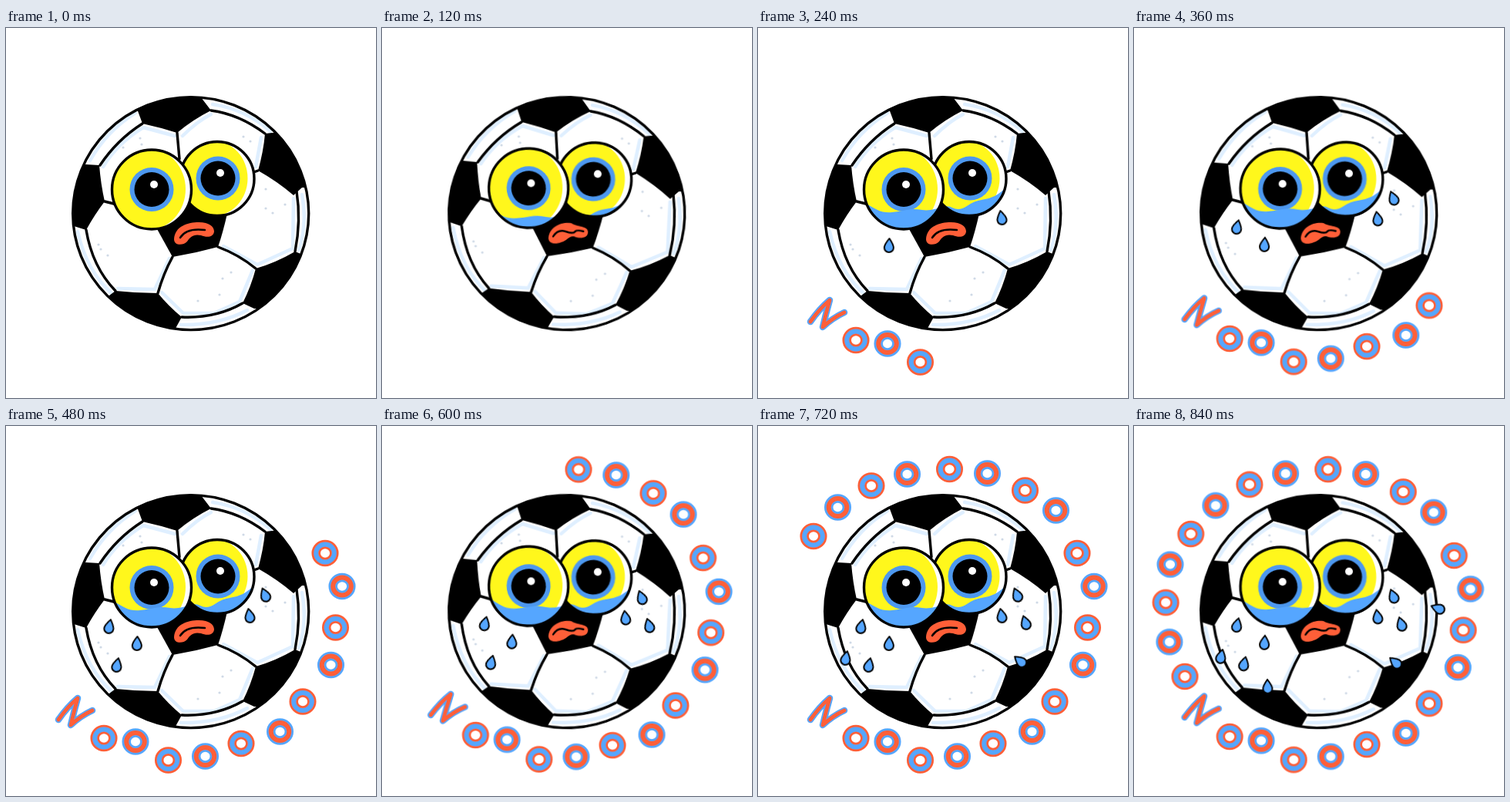
These frames come from a looping animation (480x480 px, 960 ms). An HTML page:

```html
<!DOCTYPE html>
<html lang="en">
<head>
<meta charset="utf-8">
<title>Crying football</title>
<style>
  html, body { margin: 0; width: 100%; height: 100%; overflow: hidden; background: #fff; }
  svg { display: block; width: 100vw; height: 100vh; }
  #scene { transform-origin: 239px 242px; }
  .line { fill: none; stroke: #000; stroke-width: 3.4; stroke-linecap: round; stroke-linejoin: round; }
  .shade { fill: none; stroke: #dfefff; stroke-width: 4.5; stroke-linecap: round; stroke-linejoin: round; }
  .water { fill: #55a6ff; }
  .lip { fill: #ff5f38; }
  .letter { fill: none; stroke-linecap: round; stroke-linejoin: round; }
</style>
</head>
<body>
<svg viewBox="0 0 480 480" role="img" aria-label="Nooo">
  <defs>
    <clipPath id="ballClip"><ellipse cx="239.7" cy="240.6" rx="153" ry="151"/></clipPath>
    <clipPath id="leftClip"><ellipse cx="189" cy="209.5" rx="51.5" ry="51.5"/></clipPath>
    <clipPath id="rightClip"><ellipse cx="274" cy="195.5" rx="48" ry="48"/></clipPath>
  </defs>
  <g id="scene">
    <g clip-path="url(#ballClip)">
      <rect x="80" y="80" width="320" height="320" fill="#fff"/>
      <g class="shade">
        <path d="M109 172Q130 134 168 110M126 180Q144 150 178 129L219 140"/>
        <path d="M268 99Q310 105 343 134M229 140Q248 121 266 112M331 142L324 180"/>
        <path d="M384 216Q391 255 380 288M373 221L372 286L326 307L282 283"/>
        <path d="M93 264Q104 315 139 346M212 299L193 339L145 338"/>
        <path d="M202 343L230 370L270 370L303 355L320 314M227 385Q275 386 313 366"/>
      </g>
      <g id="freckles" fill="#cfd9e6"></g>
      <path d="M166 88L170 105L177 124Q200 129 222 136Q242 119 266 107L253 90V78Z"/>
      <path d="M80 178L104 177L121 178Q123 203 128 225Q115 242 104 262L88 257L78 255Z"/>
      <path d="M336 137L354 135L400 207L384 207L373 217Q352 199 327 185Q334 160 336 137Z"/>
      <path d="M324 312Q349 305 375 290L400 300L350 365L322 364L307 357Q318 335 324 312Z"/>
      <path d="M142 341Q170 344 197 344Q211 361 228 375L217 395L165 395L130 350Z"/>
      <path d="M190 250L216 297Q246 292 275 284Q282 264 288 236L240 220Z"/>
      <g class="line">
        <path d="M177 124Q144 145 122 178M222 136L225 170M266 107Q303 112 336 137M327 185L316 189"/>
        <path d="M377 212Q383 250 375 290M324 312Q302 294 275 284M216 297Q204 319 197 344"/>
        <path d="M104 262Q112 310 142 341M128 225L140 228M228 375Q272 377 307 357"/>
      </g>
    </g>
    <ellipse class="line" cx="239.7" cy="240.6" rx="153" ry="151"/>

    <g clip-path="url(#rightClip)">
      <rect x="220" y="140" width="110" height="110" fill="#fff"/>
      <ellipse cx="268" cy="195" rx="45.5" ry="49" fill="#fff71c"/>
      <g id="rightIris"></g>
      <path class="water rise" d="M232 238Q243 228 252 233T271 231T290 223T307 218T326 203V255H232Z"/>
    </g>
    <ellipse class="line" cx="274" cy="195.5" rx="48" ry="48"/>
    <circle cx="278" cy="188" r="5" fill="#fff"/>

    <g clip-path="url(#leftClip)">
      <rect x="130" y="150" width="115" height="115" fill="#fff"/>
      <ellipse cx="184" cy="209" rx="49" ry="53" fill="#fff71c"/>
      <g id="leftIris"></g>
      <path class="water rise" d="M134 224Q147 232 155 236T174 239T193 236T213 236T245 230V268H134Z"/>
    </g>
    <ellipse class="line" cx="189" cy="209.5" rx="51.5" ry="51.5"/>
    <circle cx="192" cy="203" r="5" fill="#fff"/>

    <g id="frown">
      <path class="lip" d="M218 274C219 257 236 252 250 252C264 252 270 258 270 264C269 272 260 272 253 269C243 267 239 271 235 277C229 283 218 282 218 274Z"/>
      <path class="line" style="stroke-width:2.4" d="M226 272Q234 259 258 262"/>
    </g>
    <g id="quiver">
      <path class="lip" d="M217 273C218 258 234 251 246 253C253 258 268 255 268 264C268 272 258 273 250 270C244 269 241 276 234 278C225 282 217 280 217 273Z"/>
      <path class="line" style="stroke-width:2.4" d="M223 271Q229 261 239 264T251 264T262 263"/>
    </g>
    <g id="tears"></g>
    <g id="letters"></g>
  </g>
</svg>
<script>
const STEPS = 8, LOOP = 960;
const BLUE = '#55a6ff', ORANGE = '#ff5f38';
const byId = id => document.getElementById(id);

function add(parent, tag, attrs) {
  const el = document.createElementNS('http://www.w3.org/2000/svg', tag);
  for (const key in attrs) el.setAttribute(key, attrs[key]);
  return parent.appendChild(el);
}

// Plays one held value per step of the loop.
function hold(el, prop, valueAt) {
  const frames = [];
  for (let i = 0; i <= STEPS; i++)
    frames.push({ [prop]: valueAt(Math.min(i, STEPS - 1)), offset: i / STEPS, easing: 'step-end' });
  el.animate(frames, { duration: LOOP, iterations: Infinity }).startTime = 0;
}
const showWhen = (el, test) => hold(el, 'opacity', i => test(i) ? 1 : 0);

for (const [id, x, y] of [['leftIris', 189, 209.5], ['rightIris', 275, 195]]) {
  add(byId(id), 'circle', { cx: x, cy: y, r: 28.5, fill: '#4d98ef' });
  add(byId(id), 'circle', { cx: x, cy: y, r: 22.5 });
}

const freckles = [[152, 155], [174, 143], [176, 151], [317, 147], [308, 141],
  [337, 209], [346, 240], [337, 234], [362, 229], [120, 281], [132, 295], [123, 287],
  [281, 325], [292, 317], [249, 354], [277, 346]];
for (const [cx, cy] of freckles) add(byId('freckles'), 'circle', { cx, cy, r: 1.6 });

// x, y, tilt, first step
const tears = [[170, 282, 3, 2], [316, 246, -10, 2], [134, 260, 12, 3], [336, 219, -22, 3],
  [144, 310, 12, 4], [347, 255, -18, 5], [114, 301, 12, 6], [340, 305, -50, 6],
  [175, 339, -3, 7], [394, 234, -70, 7]];
for (const [x, y, tilt, from] of tears) {
  const drop = add(byId('tears'), 'path', {
    d: 'M0-9C3-5 6-1 6 3A6 6 0 0 1-6 3C-6-1-3-5 0-9Z',
    transform: `translate(${x} ${y}) rotate(${tilt})`,
    fill: BLUE, stroke: '#000', 'stroke-width': 2, 'stroke-linejoin': 'round'
  });
  showWhen(drop, i => i >= from);
}

function letter(d, index, main, edge, widths) {
  const g = add(byId('letters'), 'g', { class: 'letter' });
  add(g, 'path', { d, stroke: edge, 'stroke-width': widths[0] });
  add(g, 'path', { d, stroke: main, 'stroke-width': widths[1] });
  const from = 2 + Math.floor(index / 4);
  showWhen(g, i => i >= from);
}

const ring = [[127, 405], [168, 409.5], [210.5, 433.5], [258.5, 428.5], [305, 412], [355.5, 396.5],
  [385, 357.5], [421.5, 310], [427.5, 261.5], [436, 208], [414, 165], [386.5, 109.5],
  [346.5, 83.5], [297.5, 61.5], [248.5, 56], [193.5, 62.5], [147, 77.5], [103.5, 105.5],
  [72, 143], [46, 183], [41, 232.5], [46.7, 283.5], [67.5, 328]];

letter('M68 381Q80 364 93 353Q88 371 84 388Q97 376 112 369', 0, ORANGE, BLUE, [8.5, 4.8]);
ring.forEach(([x, y], i) => {
  const d = `M${x - 11.8} ${y}a11.8 11.5 0 1 1 23.6 0a11.8 11.5 0 1 1-23.6 0Z`;
  const colors = i % 2 ? [ORANGE, BLUE] : [BLUE, ORANGE];
  letter(d, i + 1, ...colors, [11.5, 6]);
});

const wobble = [0, 2, 0, 1];
hold(byId('scene'), 'transform', i => `rotate(${wobble[i % 4]}deg)`);
hold(byId('rightIris'), 'transform', i => `translateX(${i % 2 ? -2.5 : 0}px)`);
showWhen(byId('frown'), i => i % 2 === 0);
showWhen(byId('quiver'), i => i % 2 === 1);
for (const el of document.querySelectorAll('.rise'))
  hold(el, 'transform', i => `translateY(${[40, 10][i] || 0}px)`);
</script>
</body>
</html>
```
